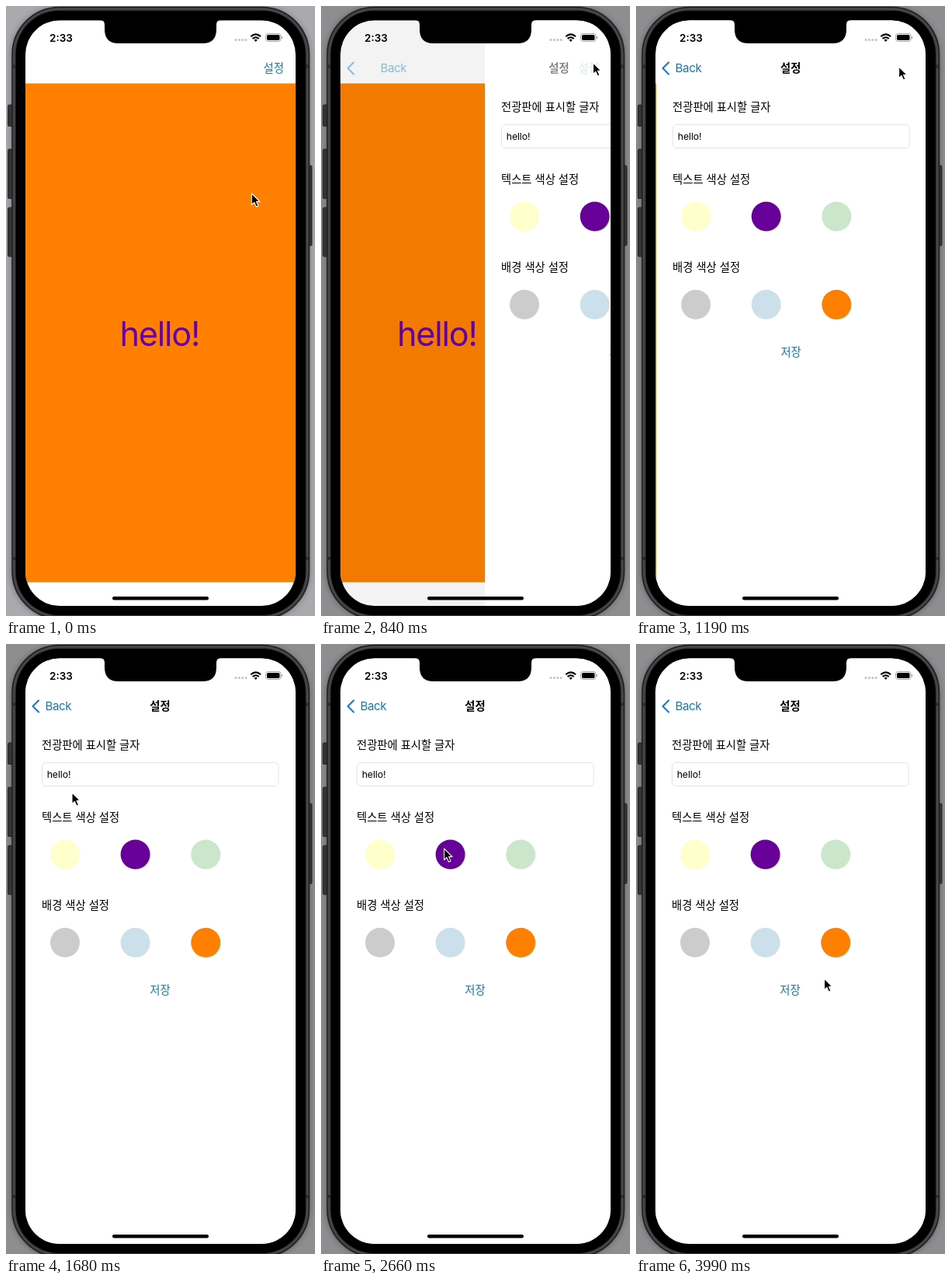
Recreate the animation shown at these times as an HTML page. Size 398 by 784 pixels, loop 4060 ms.

```html
<!DOCTYPE html>
<html lang="ko">
<head>
<meta charset="utf-8">
<style>
  html, body { margin: 0; width: 100%; height: 100%; overflow: hidden; }
  svg { display: block; width: 398px; height: 784px; }
  text { font-family: Inter, "Noto Sans CJK KR", "Noto Sans CJK", sans-serif; white-space: pre; }
  .label { font-size: 14.3px; }
  .link { fill: #1a76c0; }
  .middle { text-anchor: middle; }
</style>
</head>
<body>
<svg viewBox="0 0 398 784">
  <defs>
    <clipPath id="screen"><rect x="25" y="18.5" width="348" height="752.5" rx="44"/></clipPath>
    <filter id="soft" x="-20%" y="-20%" width="140%" height="140%"><feGaussianBlur stdDeviation="4"/></filter>
    <!-- video look: colour lies slightly below and right of brightness -->
    <filter id="video" filterUnits="userSpaceOnUse" x="-6" y="-6" width="410" height="796" color-interpolation-filters="sRGB">
      <feColorMatrix in="SourceGraphic" result="luma" values=".299 .587 .114 0 0  .299 .587 .114 0 0  .299 .587 .114 0 0  0 0 0 1 0"/>
      <feColorMatrix in="SourceGraphic" values=".3505 -.2935 -.057 0 .5  -.1495 .2065 -.057 0 .5  -.1495 -.2935 .443 0 .5  0 0 0 1 0"/>
      <feOffset dx="1.2" dy="1.2"/>
      <feGaussianBlur stdDeviation=".6" result="chroma"/>
      <feComposite in="luma" in2="chroma" operator="arithmetic" k2="1" k3="2" k4="-1"/>
    </filter>
  </defs>

  <g filter="url(#video)">
    <!-- phone body -->
    <rect id="desk" x="-6" y="-6" width="410" height="796"/>
    <rect x="8" y="2" width="382" height="786" rx="61" opacity=".4" filter="url(#soft)"/>
    <g fill="#343436" stroke="#1e1e20" stroke-width=".8">
      <rect x="2.5" y="127" width="6" height="27.5" rx="1.5"/>
      <rect x="2.5" y="184" width="6" height="63.5" rx="1.5"/>
      <rect x="2.5" y="259" width="6" height="63" rx="1.5"/>
      <rect x="389" y="205" width="5" height="103" rx="1.5"/>
    </g>
    <rect x="8" y="1.5" width="382.5" height="786" rx="61" fill="#3c3c3e" stroke="#202022" stroke-width="1.5"/>
    <rect x="10" y="3.5" width="378.5" height="782" rx="59" fill="none" stroke="#505052"/>
    <path d="M8 77.5h5M385 77.5h5M8 710h5M385 710h5" stroke="#2a2a2c" stroke-width="4"/>
    <rect x="12.5" y="6" width="373.5" height="777" rx="56"/>

    <g clip-path="url(#screen)">
      <rect x="25" y="18" width="348" height="754" fill="#fff"/>
      <g id="board">
        <rect x="25" y="99.5" width="348" height="641" fill="#ff8000"/>
        <text x="146.5" y="436.5" font-size="43.2" letter-spacing="-1.2" fill="#660099">hello!</text>
      </g>
      <rect id="dim" x="25" y="18" width="348" height="754"/>

      <g id="settings">
        <rect x="25" y="18" width="348" height="754" fill="#fff"/>
        <g class="label">
          <text x="46" y="135">전광판에 표시할 글자</text>
          <text x="46" y="228">텍스트 색상 설정</text>
          <text x="46" y="341">배경 색상 설정</text>
          <text class="link middle" x="198.5" y="450">저장</text>
        </g>
        <rect x="46.5" y="152.5" width="304.5" height="30" rx="4.5" fill="#fff" stroke="#e3e3e5"/>
        <text x="52.7" y="172" font-size="12.3" letter-spacing="-.1">hello!</text>
      </g>

      <!-- navigation bar -->
      <text id="open" class="label link middle" x="344.7" y="85">설정</text>
      <text id="title" class="label middle" x="198.5" y="85" font-weight="600">설정</text>
      <path id="chevron" d="M42 72.5l-7.5 7.5 7.5 7.5" fill="none" stroke="#1a76d0" stroke-width="2.1" stroke-linecap="round" stroke-linejoin="round"/>
      <text id="back" class="link" x="50.4" y="85.3" font-size="15.1" letter-spacing="-.38">Back</text>

      <!-- status bar -->
      <text class="middle" x="71" y="45.5" font-size="13.5" font-weight="600">2:33</text>
      <path d="M296 43.5h14" stroke="#c4c4c6" stroke-width="3.2" stroke-linecap="round" stroke-dasharray="0 4.4"/>
      <path d="M315.3 39.3q6.4-5.8 12.8 0M317.6 42q4.1-3.6 8.2 0" fill="none" stroke="#000" stroke-width="2"/>
      <path d="M319.5 43.6q2.2-1.6 4.4 0l-2.2 2.4z"/>
      <rect x="334.5" y="35.5" width="19.5" height="10" rx="3" fill="none" stroke="#a5a5a7"/>
      <rect x="336" y="37" width="16.5" height="7" rx="1.7"/>
      <path d="M355.5 39v3.2" stroke="#a5a5a7" stroke-width="1.2"/>
      <rect x="137" y="759" width="124" height="4.4" rx="2.2"/>
    </g>
    <path d="M121 18Q127 18 127 24V30Q127 48 145 48H253Q271 48 271 30V24Q271 18 277 18Z"/>

    <circle id="ring" cx="350" cy="73" r="21.5" fill="#fff" fill-opacity=".3" stroke="#000" stroke-width="1.4"/>
    <path id="cursor" d="M0 0V14.5L3.4 11.4 5.8 17 8.4 15.9 6 10.4H10.4Z" stroke="#fff" stroke-width="1.1" stroke-linejoin="round"/>
  </g>
</svg>

<script>
  const LOOP = 4060, STEP = 70, LEG = 560, PUSH = 754, WIDTH = 348;
  const OMEGA = Math.sqrt(1000 / 3) / 1000; // critically damped spring, per ms
  const $ = id => document.getElementById(id);

  const swatches = [['#ffffcc', '#660099', '#cce6cc'], ['#cccccc', '#cce0eb', '#ff8000']];
  swatches.forEach((row, r) => row.forEach((fill, c) => {
    const dot = document.createElementNS('http://www.w3.org/2000/svg', 'circle');
    const look = { cx: 76 + 90.6 * c, cy: 270.5 + 113.3 * r, r: 19, fill };
    for (const name in look) dot.setAttribute(name, look[name]);
    $('settings').append(dot);
  }));

  // where the pointer rests after each leg, and how far the leg bows out
  const stops = [
    { x: 316.5, y: 241 },
    { x: 351, y: 73 },
    { x: 350, y: 73 },
    { x: 85, y: 191 },
    { x: 97, y: 180, bowY: -66, sway: -40 },
    { x: 170, y: 275, bowY: 6 },
    { x: 247, y: 281, bowX: -72, bowY: -38 },
    { x: 242.5, y: 430, bowX: 43 }
  ];

  function pointerAt(t) {
    const leg = Math.min(t / LEG, stops.length - 1.001), i = Math.floor(leg);
    const from = stops[i], { x, y, bowX = 0, bowY = 0, sway = 0 } = stops[i + 1];
    const u = leg - i, k = u * u * (3 - 2 * u), bow = Math.sin(Math.PI * k);
    return [
      from.x + (x - from.x) * k + bowX * bow + sway * Math.sin(2 * Math.PI * k),
      from.y + (y - from.y) * k + bowY * bow
    ];
  }

  function pushProgress(t) {
    const a = OMEGA * Math.max(0, t - PUSH);
    return 1 - (1 + a) * Math.exp(-a);
  }

  const move = (id, x, y = 0) => $(id).setAttribute('transform', `translate(${x} ${y})`);
  const fade = (id, value) => $(id).setAttribute('opacity', value);

  function draw(t) {
    const p = pushProgress(t), offset = WIDTH * (1 - p);
    move('board', -0.3 * WIDTH * p);
    move('settings', offset);
    move('title', offset * 0.58);
    move('back', offset * 0.14);
    fade('dim', 0.1 * p);
    fade('open', (1 - p) ** 3);
    for (const id of ['title', 'back', 'chevron']) fade(id, p);
    fade('ring', t >= 525 && t < 735 ? 1 : 0);
    $('desk').setAttribute('fill', t < PUSH ? '#a9a9ae' : '#8e8e91');
    move('cursor', ...pointerAt(t));
  }

  const start = performance.now();
  function tick() {
    const t = (performance.now() - start) % LOOP;
    draw(Math.floor(t / STEP) * STEP);
    requestAnimationFrame(tick);
  }
  tick();
</script>
</body>
</html>
```
